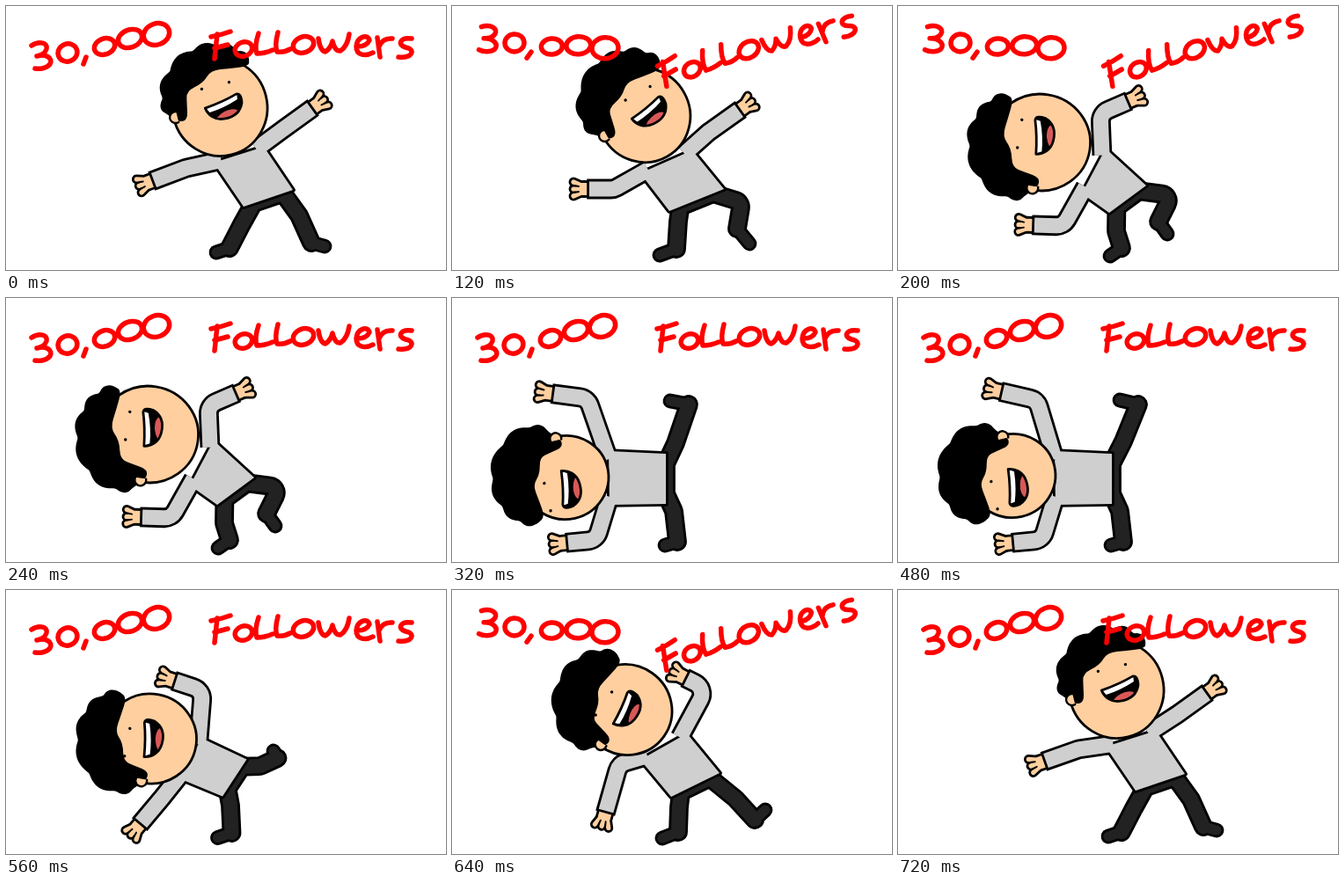
Write an HTML page with a canvas that moves like this. It is 500x300 px and loops after 840 ms.

```html
<!DOCTYPE html>
<html lang="en">
<head>
<meta charset="utf-8">
<title>30,000 Followers</title>
<style>
  html, body { margin: 0; width: 100%; height: 100%; overflow: hidden; background: #fff; }
  canvas { display: block; width: 500px; height: 300px; }
</style>
</head>
<body>
<canvas id="stage" width="500" height="300" role="img" aria-label="30,000 Followers"></canvas>
<script>
const ctx = document.getElementById('stage').getContext('2d');
const LOOP = 840, LETTER_STEP = 120, LINE = 2.8;
const SKIN = '#ffcf9f', SHIRT = '#cfcfcf', PANTS = '#222', INK = '#000', RED = '#f00';
const rad = deg => deg * Math.PI / 180;

// Poses are joints. torso: left and right armpit, right and left hip.
// arms: elbow, wrist. legs: knee, ankle, toe. Left limb comes first.
const stand = {
  head: { x: 243, y: 115, r: 55, turn: -14, flip: 1, look: 1, hair: 1.33 },
  torso: [[236, 178], [293, 160], [326, 209], [270, 228]],
  arms: [[[205, 184], [168, 198]], [[315, 140], [347, 117]]],
  legs: [[[268, 248], [254, 275], [239, 280]], [[333, 238], [347, 269], [362, 273]]]
};
const standAgain = {
  ...stand,
  head: { ...stand.head, x: 248, y: 113 },
  arms: [[[205, 181], [168, 194]], [[318, 141], [350, 118]]]
};
const lean = {
  head: { x: 218, y: 124, r: 53.5, turn: -29, flip: 1, look: 6, hair: 1.5 },
  torso: [[214, 190], [273, 164], [309, 208], [247, 233]],
  arms: [[[184, 208], [156, 208]], [[291, 144], [326, 119]]],
  legs: [[[257, 245], [255, 276], [236, 283]], [[329, 223], [324, 253], [338, 270]]]
};
const fall = {
  head: { x: 162, y: 155, r: 56, turn: -81, flip: 1, look: 6, hair: 1.48 },
  torso: [[209, 213], [236, 162], [282, 204], [240, 235]],
  arms: [[[188, 250], [155, 249]], [[230, 122], [260, 109]]],
  legs: [[[248, 256], [254, 275], [241, 284]], [[311, 215], [296, 245], [306, 259]]]
};
const lie = {
  head: { x: 129, y: 204, r: 48.5, turn: -103, flip: -1, look: 17, hair: 1.74 },
  torso: [[179, 235], [178, 174], [243, 177], [243, 234]],
  arms: [[[164, 275], [132, 278]], [[154, 114], [116, 109]]],
  legs: [[[252, 242], [256, 277], [242, 281]], [[254, 165], [269, 121], [248, 117]]]
};
const lieAgain = {
  ...lie,
  head: { ...lie.head, x: 130, y: 202 },
  arms: [[[164, 275], [132, 278]], [[158, 116], [119, 107]]],
  legs: [lie.legs[0], [[256, 163], [273, 121], [252, 116]]]
};
const rise = {
  head: { x: 198, y: 136, r: 52, turn: -55, flip: 1, look: -9, hair: 1.62 },
  torso: [[214, 193], [267, 163], [304, 208], [249, 235]],
  arms: [[[190, 198], [175, 251]], [[289, 112], [267, 101]]],
  legs: [[[258, 247], [257, 275], [239, 282]], [[322, 237], [344, 261], [356, 250]]]
};

function blend(a, b, k) {
  if (typeof a === 'number') return a + (b - a) * k;
  if (Array.isArray(a)) return a.map((v, i) => blend(v, b[i], k));
  return Object.fromEntries(Object.keys(a).map(key => [key, blend(a[key], b[key], k)]));
}
const rising = blend(lieAgain, rise, 0.5);
rising.head = { ...rise.head, x: rising.head.x, y: rising.head.y, turn: rising.head.turn };

const timeline = [
  [0, stand], [120, lean], [200, fall], [320, lie], [400, blend(lie, lieAgain, 0.5)],
  [480, lieAgain], [560, rising], [640, rise], [720, standAgain]
];

// Line through joints, with rounded bends
function limb(joints, bend = 10) {
  const path = new Path2D();
  path.moveTo(...joints[0]);
  for (let i = 1; i < joints.length - 1; i++) path.arcTo(...joints[i], ...joints[i + 1], bend);
  path.lineTo(...joints.at(-1));
  return path;
}

// Closed curve through the midpoints of its corners
function rounded(points) {
  const path = new Path2D(), mid = i => blend(points[i], points[(i + 1) % points.length], 0.5);
  path.moveTo(...mid(points.length - 1));
  points.forEach((p, i) => path.quadraticCurveTo(...p, ...mid(i)));
  path.closePath();
  return path;
}

function stroke(path, color, width, cap = 'round') {
  ctx.strokeStyle = color;
  ctx.lineWidth = width;
  ctx.lineCap = cap;
  ctx.stroke(path);
}

function paint(path, fill, width = LINE) {
  ctx.fillStyle = fill;
  ctx.fill(path);
  stroke(path, INK, width);
}

// Several tubes [path, width] merged under one outline
function tubes(parts, color) {
  for (const [path, width] of parts) stroke(path, INK, width + LINE);
  for (const [path, width] of parts) stroke(path, color, width - LINE);
}

function withFrame(x, y, turn, flip, action) {
  ctx.save();
  ctx.translate(x, y);
  ctx.rotate(rad(turn));
  ctx.scale(flip, 1);
  action();
  ctx.restore();
}

function drawLegs({ torso, legs }) {
  const hip = k => blend(torso[3], torso[2], k);
  const [left, right] = legs;
  const trousers = limb([left[1], left[0], hip(0.2), hip(0.8), right[0], right[1]], 8);
  const feet = legs.map(([, ankle, toe]) => [limb([ankle, toe]), 14]);
  tubes([[trousers, 19], ...feet], PANTS);
}

function drawHand([elbow, wrist]) {
  const turn = Math.atan2(wrist[1] - elbow[1], wrist[0] - elbow[0]) * 180 / Math.PI;
  withFrame(...wrist, turn, 1, () => {
    const fingers = [-1, 0, 1].map(side => [limb([[9, side * 4], [18, side * 8]]), 8]);
    tubes([[limb([[0, 0], [8, 0]]), 17], ...fingers], SKIN);
    stroke(new Path2D('M12-3L17-4M12 3L17 4'), INK, 2);
  });
}

function drawShirt({ torso, arms }) {
  const body = new Path2D('M' + torso.join('L') + 'Z');
  const sleeves = arms.map(([elbow, wrist], i) => {
    const line = [blend(torso[0], torso[1], i ? 0.85 : 0.15), elbow, wrist];
    const reach = Math.hypot(wrist[0] - elbow[0], wrist[1] - elbow[1]);
    const cuff = blend(elbow, wrist, 1 + LINE / reach);
    return { cloth: limb(line, 14), edge: limb([line[0], elbow, cuff], 14) };
  });
  stroke(body, INK, LINE * 2);
  for (const { edge } of sleeves) stroke(edge, INK, 20 + LINE, 'butt');
  ctx.fillStyle = SHIRT;
  ctx.fill(body);
  for (const { cloth } of sleeves) stroke(cloth, SHIRT, 20 - LINE, 'butt');
}

// Lumpy crown from the right temple to the ear, closed by a wavy hairline
function hairShape(r, peak) {
  const crown = Array.from({ length: 57 }, (_, i) => {
    const t = i / 56, angle = rad(-42 - 130 * t);
    const lump = 0.09 * Math.abs(Math.sin(6 * Math.PI * t + Math.sin(5 * t)));
    const size = r * (1.04 + (peak - 1.1) * Math.sqrt(Math.sin(Math.PI * t)) + lump);
    return [size * Math.cos(angle), size * Math.sin(angle)];
  });
  const hairline = [[-0.9, 0.08], [-0.72, 0.08], [-0.66, -0.22], [-0.6, -0.5], [-0.22, -0.58], [0, -0.8], [0.4, -0.74]];
  return rounded([...crown, ...hairline.map(([x, y]) => [x * r, y * r])]);
}

const mouth = new Path2D('M-21-3Q0-5 17-10Q23-10 21 1C17 11 8 15-3 14C-14 13-20 5-21-3Z');
const teeth = new Path2D('M-21-4Q0-6 18-11L17-4Q0 2-17 3Z');

function drawMouth() {
  ctx.fillStyle = INK;
  ctx.fill(mouth);
  ctx.save();
  ctx.clip(mouth);
  ctx.fillStyle = '#fff';
  ctx.fill(teeth);
  ctx.fillStyle = '#d85858';
  ctx.beginPath();
  ctx.ellipse(1, 13, 14, 7, -0.25, 0, 7);
  ctx.fill();
  ctx.restore();
  stroke(mouth, INK, LINE);
}

function drawHead({ x, y, r, turn, flip, look, hair }) {
  withFrame(x, y, turn, flip, () => {
    const skull = new Path2D(), ear = new Path2D(), eyes = new Path2D();
    skull.ellipse(0, 0, r * 0.98, r * 1.01, 0, 0, 7);
    paint(skull, SKIN);
    paint(hairShape(r, hair), INK, 1.5);
    ear.arc(-r * 0.94, -1, 6.5, rad(70), rad(290));
    paint(ear, SKIN, 2.4);
    for (const side of [-16, 16]) eyes.arc(look + side, -25, 1.6, 0, 7), eyes.closePath();
    ctx.fillStyle = INK;
    for (const side of [-16, 16]) {
      ctx.beginPath();
      ctx.arc(look + side, -25, 1.7, 0, 7);
      ctx.fill();
    }
    ctx.translate(look / 2 + 4, 0);
    drawMouth();
  });
}

// Hand lettering: each word is drawn about its first letter and swings between two tilts
function lettering(strokes, ovals) {
  const path = new Path2D(strokes);
  for (const [x, y, rx, ry] of ovals) {
    const oval = new Path2D();
    oval.ellipse(x, y, rx, ry, -0.35, 0, 7);
    path.addPath(oval);
  }
  return path;
}
const words = [
  {
    path: lettering(
      'M-11-12C-2-18 8-15 6-8C4-2-1-1-5 0C5-3 14 2 10 9C6 14-2 15-7 14M51 1L48 9',
      [[30, -4, 11, 10], [72, -11, 12, 9], [101, -20, 14, 10], [131, -25, 15, 12]]),
    places: [[40, 57, 0], [41, 38, 15]]
  },
  {
    path: lettering(
      'M-11-11Q0-13 11-17M-4-14L-7 14M-7 2L8-2' +
      'M43-15Q38 0 41 8Q50 8 59 4M65-16Q61-1 64 6Q72 7 79 3' +
      'M111-9Q113 5 119 6Q125 2 127-6Q130 6 136 5Q144 0 146-14' +
      'M155 0Q166 0 169-7C167-15 155-11 154 0C154 11 165 11 173 7' +
      'M178-10L181 12M180 0Q184-10 195-9' +
      'M217-9C204-11 200-2 210 1C222 3 218 14 202 12',
      [[26, 3, 10, 8], [94, -2, 12, 9]]),
    places: [[244, 46, 0], [247, 76, -15]]
  }
];

function draw(time) {
  const pose = timeline.findLast(([start]) => time >= start)[1];
  const swing = Math.floor(time / LETTER_STEP) % 2;
  ctx.fillStyle = '#fff';
  ctx.fillRect(0, 0, 500, 300);
  ctx.lineJoin = 'round';
  drawLegs(pose);
  pose.arms.forEach(drawHand);
  drawShirt(pose);
  drawHead(pose.head);
  for (const { path, places } of words) {
    withFrame(...places[swing], 1, () => stroke(path, RED, 5.5));
  }
}

const start = performance.now();
function tick() {
  draw((performance.now() - start) % LOOP);
  requestAnimationFrame(tick);
}
tick();
</script>
</body>
</html>
```
